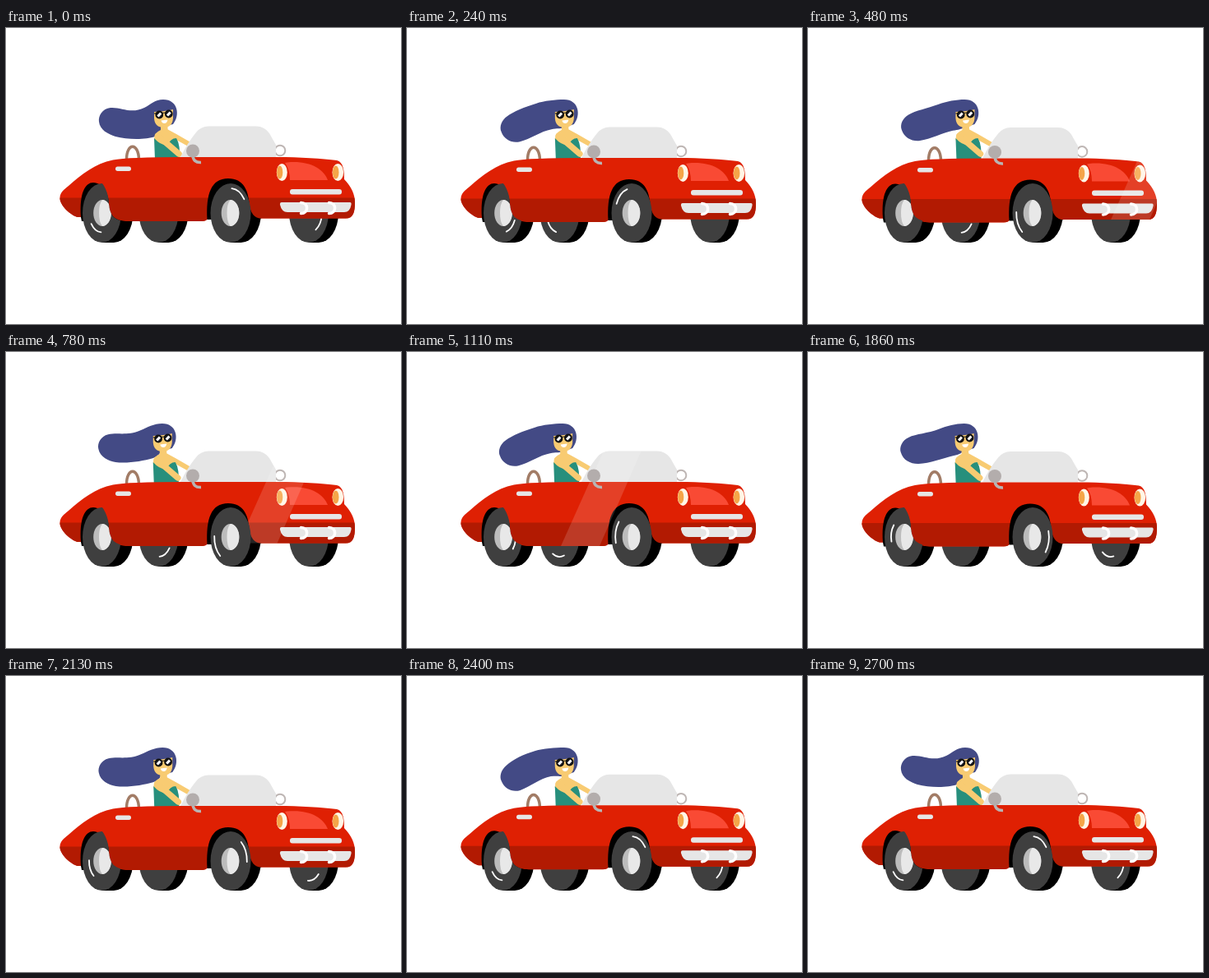
Recreate the animation shown at these times as an HTML page. Size 480 px wide and 360 px high, loop 2730 ms.

```html
<!DOCTYPE html>
<html lang="en">
<head>
<meta charset="utf-8">
<title>Red convertible</title>
<style>
html, body { margin: 0; width: 100%; height: 100%; overflow: hidden; background: #fff; }
svg { display: block; width: 100vw; height: 100vh; }
.skin { fill: #f8cb72; }
.limb { fill: none; stroke: #f8cb72; stroke-linecap: round; stroke-linejoin: round; }
.pale { fill: #e6e6e6; }
.mark { fill: none; stroke: #fff; stroke-width: 1.8; stroke-linecap: round; vector-effect: non-scaling-stroke; }
</style>
</head>
<body>
<svg viewBox="0 0 480 360">
  <defs>
    <path id="shell" d="M65.500 207C65.500 200 70 197 76 192C92 178 108 165 130 160.500Q148 157 215 157H330C356 157 385 159 402 161C410 163 411 173 411 184C420 193 424 203 424 212C424 224 422 231.500 413 231.500H297L245 232Q243 235 238 235H148L92 230H87C79 228 65.500 216 65.500 207Z"/>
    <path id="glass" d="M212 157Q221 139 231 127Q237 119.500 246 119.500H304Q314 119.500 320 128Q325 137 328 142V157Z"/>
    <clipPath id="inShell"><use href="#shell"/></clipPath>
    <clipPath id="inCar"><use href="#shell"/><use href="#glass"/></clipPath>
    <clipPath id="rearGap"><path d="M85 265V180H108C120 188 125 203 125 213C125 228 133 235.500 148 235.500V265Z"/></clipPath>
  </defs>

  <g id="far"></g>
  <g id="depth"></g>

  <g id="seat" fill="none">
    <path d="M146.500 160C146.500 139 161 139 161.500 160" stroke="#a27c66" stroke-width="3.500"/>
  </g>

  <g id="driver">
    <path id="hair" fill="#434a85"/>
    <path class="limb" d="M195 126L206 132L222 141" stroke-width="6"/>
    <path class="skin" d="M188 115H196.500V124L207 131L209 142L188 147L180 136Q180 127 188 124Z"/>
    <path d="M180 134Q187 142 196 143Q200 134 207 134Q212 142 211 160H181Z" fill="#278f7c"/>
    <path class="limb" d="M184.500 131L210 153" stroke-width="7.500"/>
    <path class="skin" d="M180 102Q193 101.500 203 99V110Q202 121 191.500 121Q181 121 180 110Z"/>
    <g stroke="#111" stroke-width="2" fill="#23232c">
      <circle cx="186.300" cy="105.500" r="3.900"/>
      <circle cx="197.800" cy="104.500" r="3.900"/>
      <path d="M180 104L202 102.500" stroke-width="1.200"/>
    </g>
    <path d="M184.500 107.500L188.200 103.500M196 106.500L199.700 102.500" stroke="#fff" stroke-width="3"/>
    <path d="M188.500 112.500L196.500 111.500Q195.500 116 192.500 116Q189.500 116 188.500 112.500Z" fill="#fff"/>
  </g>

  <g id="car">
    <circle cx="333" cy="149" r="6.300" fill="#fff" stroke="#beb6b4" stroke-width="2"/>
    <use href="#glass" class="pale"/>
    <use href="#shell" fill="#df2003"/>
    <path clip-path="url(#inShell)" d="M60 206.500H430V240H60Z" fill="#b21a02"/>
    <path d="M342 163.500C368 161 386 171 391 185H345Q345 172 339 164Z" fill="#f94a34"/>
    <path d="M91 230C89 201 96 188 106 188C118 188 125 203 125 213C125 228 133 235 148 235H92Z"/>
    <path d="M244.500 233C243 202 249 183 270 183C289 183 294 198 295.500 212Q297 231.500 311 232Z"/>
    <g class="pale">
      <rect x="133" y="168.500" width="19" height="5.500" rx="2.700"/>
      <rect x="345" y="196" width="63" height="6.500" rx="3"/>
      <path d="M335 212H418Q420 212 419.500 215Q418 224 411 224H342Q335 224 333 215Q332.500 212 335 212Z"/>
    </g>
    <path d="M358.500 212.500C368 212.500 368 225.500 358.500 225.500M392.500 212.500C402 212.500 402 225.500 392.500 225.500" fill="none" stroke="#fff" stroke-width="3.500" stroke-linecap="round"/>
    <g fill="#fff6e6">
      <ellipse cx="335.300" cy="175.500" rx="6.500" ry="10.500"/>
      <ellipse cx="403.300" cy="175.500" rx="6.800" ry="10.500"/>
    </g>
    <g fill="#f5a548">
      <ellipse cx="332.700" cy="175.500" rx="3.600" ry="8"/>
      <ellipse cx="400.700" cy="175.500" rx="3.800" ry="8"/>
    </g>
    <g clip-path="url(#inCar)">
      <path id="shine" d="M0 235L52 119H98L47 235Z" fill="#fff" opacity=".14"/>
    </g>
    <path d="M227 154Q227 164 237 163.500" fill="none" stroke="#b9b4b3" stroke-width="3.500"/>
    <circle cx="227" cy="149.500" r="8" fill="#b3adac"/>
  </g>

  <g id="rear" clip-path="url(#rearGap)"></g>
  <g id="front"></g>
</svg>
<script>
const STEP = 30, LOOP = 2730, CYCLE = 2700, SPIN = 300;
const $ = id => document.getElementById(id);
const marks = [];

// Two extreme poses of the hair; the swing blends between them.
const WAVY = [191,87, 181,87, 176,93, 168,97, 152,105, 140,96, 127,97, 117,98, 112,107, 113,114,
  114,124, 124,129, 133,132, 148,136, 170,136, 181,132, 186,130, 189,125, 189,120];
const ARCHED = [191,87, 181,87, 165,88, 156,91, 142,95, 128,102, 121,109, 115,114, 112,122, 115,128,
  119,138, 129,142, 138,139, 150,135, 162,124, 175,122, 182,121, 187,122, 189,122];

function add(parent, tag, attrs) {
  const el = document.createElementNS("http://www.w3.org/2000/svg", tag);
  for (const k in attrs) el.setAttribute(k, attrs[k]);
  return parent.appendChild(el);
}

function oval(parent, cx, cy, rx, ry, fill) {
  add(parent, "ellipse", { cx, cy, rx, ry, fill });
}

function tyre(parent, x, w, depth) {
  oval(parent, x + depth, 225, w, 36, "#000");
  add(parent, "path", { d: `M${x} 189H${x + depth}V261H${x}Z` });
}

function face(parent, x, w, r, angle) {
  oval(parent, x, 225, w, 36, "#3f3f3f");
  const a = 26 * Math.PI / 180, c = r * Math.cos(a), s = r * Math.sin(a);
  const el = add(parent, "path", { class: "mark", d: `M${c} ${-s}A${r} ${r} 0 0 1 ${c} ${s}` });
  marks.push({ el, x, angle });
}

function hub(parent, x) {
  oval(parent, x, 225, 10.8, 16, "#bcbcbc");
  add(parent, "path", {
    d: `M${x} 209A10.8 16 0 0 1 ${x} 241Q${x - 4} 236 ${x - 4} 225Q${x - 4} 214 ${x} 209Z`, fill: "#e8e8e8"
  });
}

for (const [x, angle] of [[185.5, -156], [368, 32]]) {
  tyre($("far"), x, 24, 12);
  face($("far"), x, 24, 24, angle);
}
tyre($("depth"), 116.5, 23.5, 14.5);
tyre($("depth"), 273, 24.5, 12.5);
face($("rear"), 116.5, 23.5, 23.5, 120);
face($("front"), 273, 24.5, 30, -60);
hub($("rear"), 117);
hub($("front"), 272.5);

const wave = (t, n) => Math.cos(2 * Math.PI * n * t / CYCLE);

function hairPath(k) {
  const p = WAVY.map((v, i) => (ARCHED[i] + (v - ARCHED[i]) * k).toFixed(2));
  return `M${p.slice(0, 2)}C${p.slice(2)}L203 117C212 106 209 87 191 87Z`;
}

function draw() {
  const t = Math.floor(performance.now() % LOOP / STEP) * STEP;
  const bob = `translate(0 ${0.75 * (1 - wave(t, 8))})`;
  $("car").setAttribute("transform", bob);
  $("seat").setAttribute("transform", bob);
  $("driver").setAttribute("transform", `translate(${wave(t, 1) - 1})`);
  $("hair").setAttribute("d", hairPath(((1 + wave(t, 4)) / 2) ** 1.3));
  $("shine").setAttribute("transform", `translate(${187 - 0.285 * (t - 1110)})`);
  for (const m of marks) {
    m.el.setAttribute("transform", `translate(${m.x} 225) scale(.66 1) rotate(${m.angle + 360 * t / SPIN})`);
  }
  requestAnimationFrame(draw);
}
draw();
</script>
</body>
</html>
```
